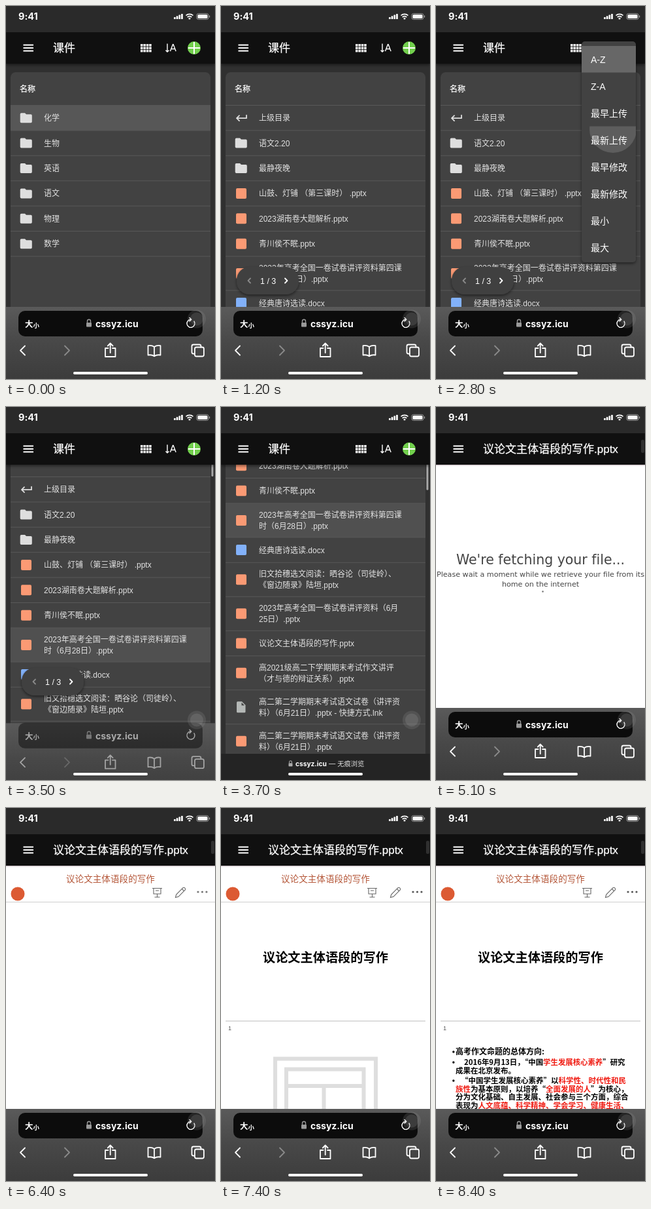
Write an HTML page that moves like this. It is 320 px wide and 569 px high and loops after 8600 ms.

```html
<!DOCTYPE html>
<html lang="zh-CN">
<head>
<meta charset="utf-8">
<title>课件</title>
<style>
html, body { margin: 0; width: 100%; height: 100%; overflow: hidden; background: #303030; }
svg { display: block; width: 100vw; height: 100vh; }
text { white-space: pre; font-variant-ligatures: none; font-family: "Liberation Sans", "Noto Sans CJK SC", "Noto Sans CJK", sans-serif; }
.ui { font-family: Inter, "Noto Sans CJK SC", "Noto Sans CJK", sans-serif; }
.han { font-family: "Noto Sans CJK SC", "Noto Sans CJK", sans-serif; }
.fetch { font-family: "DejaVu Sans", sans-serif; text-anchor: middle; }
.b { font-weight: 700; }
.m { font-weight: 500; stroke: #fff; stroke-width: .25; }
.line { fill: none; stroke: #fff; stroke-width: 1.8; stroke-linecap: round; stroke-linejoin: round; }
.thin { stroke-width: 1.4; }
.flat { stroke-linecap: butt; }
.dim { stroke: #8a8a8a; }
</style>
</head>
<body>
<svg id="stage" viewBox="0 0 320 569"></svg>
<script>
const LOOP = 8600, STEP = 100;
const LIST_TOP = 151.5, ROW = 38.4, TALL = 52;

const rect = (x, y, w, h, fill, more = '') =>
  `<rect x="${x}" y="${y}" width="${w}" height="${h}" fill="${fill}" ${more}/>`;
const circle = (x, y, r, fill, more = '') =>
  `<circle cx="${x}" cy="${y}" r="${r}" fill="${fill}" ${more}/>`;
// y is the middle of the glyphs
const text = (x, y, str, size, fill = '#fff', cls = '') =>
  `<text x="${x}" y="${(y + size * 0.37).toFixed(2)}" font-size="${size}" fill="${fill}" class="${cls}">${str}</text>`;
const line = (d, cls = '', more = '') => `<path class="line ${cls}" d="${d}" ${more}/>`;
const fill = (d, color = '#fff') => `<path d="${d}" fill="${color}"/>`;
const group = (id, ...parts) => `<g id="${id}">${parts.join('')}</g>`;

const icons = {
  folder: y => fill(`M23.5 ${y - 7.5}h5.5l2 2h7q1.8 0 1.8 1.8v9.4q0 1.8-1.8 1.8h-14.5q-1.8 0-1.8-1.8v-11.4q0-1.8 1.8-1.8z`, '#dedede'),
  up: y => line(`M39 ${y - 4}v4.5h-15m4-4-4 4 4 4`, '', 'style="stroke:#dedede"'),
  slides: y => rect(23, y - 8, 16, 16, '#fb9a74', 'rx="2"'),
  doc: y => rect(23, y - 8, 16, 16, '#82b1fa', 'rx="2"'),
  file: y => fill(`M25.5 ${y - 8.5}h6.5l5.5 5.5v10q0 1.5-1.5 1.5h-10.5q-1.5 0-1.5-1.5v-14q0-1.5 1.5-1.5z`, '#b4b8b6')
    + fill(`M31.5 ${y - 7}v4.5h4.5z`, '#424242')
};

const rootRows = ['化学', '生物', '英语', '语文', '物理', '数学'].map(s => ['folder', s]);
const subRows = [
  ['up', '上级目录'],
  ['folder', '语文2.20'],
  ['folder', '最静夜晚'],
  ['slides', '山鼓、灯铺 （第三课时） .pptx'],
  ['slides', '2023湖南卷大题解析.pptx'],
  ['slides', '青川侯不眠.pptx'],
  ['slides', '2023年高考全国一卷试卷讲评资料第四课', '时（6月28日）.pptx'],
  ['doc', '经典唐诗选读.docx'],
  ['slides', '旧文拾穗选文阅读：晒谷论（司徒岭）、', '《窗边随录》陆垣.pptx'],
  ['slides', '2023年高考全国一卷试卷讲评资料（6月', '25日）.pptx'],
  ['slides', '议论文主体语段的写作.pptx'],
  ['slides', '高2021级高二下学期期末考试作文讲评', '（才与德的辩证关系）.pptx'],
  ['file', '高二第二学期期末考试语文试卷（讲评资', '料）（6月21日）.pptx - 快捷方式.lnk'],
  ['slides', '高二第二学期期末考试语文试卷（讲评资', '料）（6月21日）.pptx'],
  ['slides', '课前演讲 (2).pptx']
];
const HOVERED = 6, PICKED = 10;

const rowBox = (rows, n) => {
  let y = LIST_TOP;
  for (let i = 0; i < n; i++) y += rows[i].length > 2 ? TALL : ROW;
  return { y, h: rows[n].length > 2 ? TALL : ROW };
};
const list = rows => rows.map(([icon, ...lines], i) => {
  const { y, h } = rowBox(rows, i), mid = y + h / 2;
  const tops = lines.length > 1 ? [mid - 8.4, mid + 8.4] : [mid];
  return icons[icon](mid) + tops.map((ty, k) => text(58, ty, lines[k], 12, '#e2e2e2')).join('')
    + rect(7, y + h - 0.5, 306, 1, '#585858');
}).join('');
const rowBar = (id, rows, n, color) => {
  const { y, h } = rowBox(rows, n);
  return rect(7, y, 306, h, color, `id="${id}"`);
};
const picked = rowBox(subRows, PICKED), pickedMid = picked.y + picked.h / 2;
const tapped = rowBox(rootRows, 3);
const clip = (id, x, y, w, h) => `<clipPath id="${id}">${rect(x, y, w, h, '#000')}</clipPath>`;
const ripple = (id, x, y, clipId) =>
  `<g clip-path="url(#${clipId})">${circle(x, y, 0, '#fff', `id="${id}" opacity=".14"`)}</g>`;

const burger = line('M26.5 59.5h15.5M26.5 64h15.5M26.5 68.5h15.5', 'flat');
const menuItems = ['A-Z', 'Z-A', '最早上传', '最新上传', '最早修改', '最新修改', '最小', '最大'];
const grid = [0, 1, 2, 3].flatMap(c => [0, 1, 2].map(r => rect(206 + c * 4.4, 58 + r * 4.4, 3.5, 3.5, '#fff'))).join('');

const slideLine = (x, y, str, size = 11.5) => text(x, y, str, size, '#000', 'han b');
const bullet = y => circle(26.8, y, 1.7, '#000');
const red = s => `<tspan fill="#f01b12">${s}</tspan>`;
const lock = (x, y, k, color) =>
  `<g transform="translate(${x} ${y}) scale(${k})">${rect(-4, -1, 8, 6.5, color, 'rx="1"')}<path d="M-2.5-1v-2.2a2.5 2.5 0 0 1 5 0V-1" fill="none" stroke="${color}" stroke-width="1.4"/></g>`;

const files = group('files',
  rect(0, 0, 320, 569, '#303030'),
  group('page',
    rect(7, 101, 306, 900, '#424242', 'rx="8"'),
    text(21, 126.5, '名称', 12, '#fff', 'm'),
    rect(7, 151, 306, 1, '#585858'),
    group('root',
      rowBar('rootHover', rootRows, 0, '#575757'),
      rowBar('rootTap', rootRows, 3, '#575757'),
      ripple('rootRipple', 120, tapped.y + 19, 'rootClip'), list(rootRows)),
    group('sub',
      rowBar('subHover', subRows, HOVERED, '#505050'),
      rowBar('pickHover', subRows, PICKED, '#505050'),
      list(subRows),
      group('pick',
        rect(7, picked.y, 306, picked.h, '#3f5654'),
        circle(31, pickedMid, 9, '#45b9b3'), line(`M27 ${pickedMid}l3 3 5.5-6`, '', 'style="stroke:#3f5654"'),
        text(58, pickedMid, '议论文主体语段的写作.pptx', 12, '#fff', 'b')),
      ripple('pickRipple', 150, pickedMid, 'pickClip'))),
  group('pager',
    rect(24, 398, 95, 42, '#404040', 'rx="20" filter="url(#shadow)"'),
    line('M45 415.5l-3.5 3.5 3.5 3.5', 'dim'), line('M98 415.5l3.5 3.5-3.5 3.5'),
    text(60, 419.5, '1 / 3', 12.5)),
  rect(314.5, 0, 3, 74, '#a8a8a8', 'id="thumb" rx="1.5"'),
  rect(0, 40, 320, 48, '#101010', 'filter="url(#shadow)"'));

const viewer = group('viewer',
  rect(0, 40, 320, 529, '#fff'),
  rect(0, 88, 320, 1.5, '#d8cdd2'),
  group('fetch',
    text(160, 232, "We're fetching your file...", 20.5, '#444', 'fetch'),
    text(160, 255, 'Please wait a moment while we retrieve your file from its', 11.14, '#444', 'fetch'),
    text(160, 269.5, 'home on the internet', 11.14, '#444', 'fetch'),
    circle(163.5, 281.5, 1.3, '#777')),
  group('deck',
    text(92, 108, '议论文主体语段的写作', 13.6, '#b5583a', 'han'),
    circle(18, 131, 10.5, '#dc5a33'),
    `<g fill="none" stroke="#666" stroke-width="1.1">
      <path d="M224 122.500h15M226 122.500v8.500h11v-8.500M229 126h5M231.500 131v5M227.500 136h8"/>
      <path d="M259.500 136.500l1.200-4.500 10.300-10.300q1.500-1 2.900.4t.4 2.900l-10.300 10.300zM269.500 123.500l3.300 3.300"/></g>`,
    group('dots', ...[294, 300.5, 307].map(x => circle(x, 128, 1.6, '#555'))),
    rect(0, 143, 320, 1, '#cfcfcf')),
  group('slide1',
    text(64, 228, '议论文主体语段的写作', 19.2, '#000', 'han b'),
    rect(7, 324.5, 306, 1, '#bcbcbc'), text(11, 336, '1', 9, '#555')),
  group('blank',
    `<g fill="none" stroke="#dedede" stroke-width="6"><path d="M83 480V382.500h154V480M100 480V398.500h118.500V480M100 424h118.500M157.500 424v56"/></g>`),
  group('slide2',
    [372, 388, 416].map(bullet).join(''),
    slideLine(30, 372, '高考作文命题的总体方向:', 12),
    slideLine(43, 388, `2016年9月13日，“中国${red('学生发展核心素养')}”研究`, 11.4),
    slideLine(30, 401, '成果在北京发布。'),
    slideLine(38, 416, `“中国学生发展核心素养”以${red('科学性、时代性和民')}`),
    slideLine(30, 428.5, `${red('族性')}为基本原则，以培养“${red('全面发展的人')}”为核心，`),
    slideLine(30, 441, '分为文化基础、自主发展、社会参与三个方面，综合'),
    slideLine(30, 454, `表现为${red('人文底蕴、科学精神、学会学习、健康生活、')}`)));

const header = [
  rect(0, 0, 320, 41, '#2a2a2a'),
  rect(0, 40, 320, 48, '#101010'),
  text(19, 16, '9:41', 14.5, '#fff', 'ui b'),
  [0, 1, 2, 3].map(i => rect(257 + i * 3.7, 17 - i * 1.7, 2.7, 3 + i * 1.7, '#fff', 'rx=".6"')).join(''),
  `<g fill="none" stroke="#fff" stroke-width="1.7"><path d="M275.500 14.500a8 8 0 0 1 11 0M277.700 17a5 5 0 0 1 6.600 0"/></g>`,
  circle(281, 19.2, 1.4, '#fff'),
  rect(292, 11.5, 18, 9, 'none', 'rx="2.7" stroke="#999"'), rect(293.5, 13, 15, 6, '#fff', 'rx="1.5"'),
  rect(311, 14.5, 1.2, 3, '#999'),
  group('browseBar', burger, text(72, 64, '课件', 17, '#fff', 'm'), grid,
    line('M247 57.5v12.5M244.5 67.5l2.5 2.500 2.500-2.500M251.500 69l4-10.500h.6l4 10.500M253 65.500h5.800', 'thin flat'),
    circle(288, 64, 10, '#72cf4d'), rect(279, 63, 18, 2, '#fff'), rect(287, 55, 2, 18, '#fff'),
    circle(252, 64, 17, '#fff', 'id="sortTap" opacity=".16"')),
  group('pickBar', line('M41 64h-13M34 57.5l-6.5 6.5 6.5 6.5'),
    line('M243.5 57.5h-6.5v14h14.5v-6.5M247 57h5v5M251.5 57.5l-9 9'),
    fill('M280 71q-4.5-.5-4.5-5t5-5q1.5-4.5 6-4.5t6 5q4 .5 4 4.8t-4.5 4.7z'),
    fill('M284.5 61.5h3.5v3.5h3l-4.8 4.7-4.7-4.7h3z', '#101010')),
  group('viewBar', burger, text(72, 64, '议论文主体语段的写作.pptx', 17, '#fff', 'm'),
    rect(314, 50, 5, 20, '#303030', 'rx="2"'))
].join('');

const menu = group('menu',
  rect(223, 54, 83, 337, '#424242', 'rx="5" filter="url(#shadow)"'),
  rect(223, 61, 83, 40.5, '#676767'),
  ripple('menuRipple', 271, 188, 'menuClip'),
  ...menuItems.map((s, i) => text(237, 81.5 + i * 41, s, 14)));

const chrome = [
  rect(0, 459, 320, 120, 'url(#barFill)', 'id="bar"'),
  group('tools',
    rect(19, 465, 282, 39, '#0c0c0c', 'rx="10"'),
    text(29, 485.5, '大', 12.5, '#fff', 'han b'), text(41.5, 487, '小', 9.5, '#fff', 'han b'),
    lock(127, 484, 1, '#9a9a9a'), text(137, 485, 'cssyz.icu', 14, '#fff', 'ui b'),
    line('M288 481a6 6 0 1 1-5-2.700M281 475.500l2.800 2.800-2.800 2.800', 'thin'),
    line('M29 518.5l-7 7 7 7'), line('M90 518.5l7 7-7 7', 'dim'),
    line('M156.5 522h-4.5v13h15.5v-13h-4.5M159.7 529v-14M155.8 518.5l3.9-4 3.9 4'),
    line('M227 520q-4-3-9.5-1.8v14.3q6-1 9.5 1.8 3.5-2.8 9.5-1.8v-14.3q-5.5-1.2-9.5 1.8v14'),
    line('M288.5 530.5h-1.5q-2.5 0-2.5-2.5v-9q0-2.5 2.5-2.5h9q2.5 0 2.5 2.5v1.5'),
    rect(289, 520.5, 14, 14, 'none', 'class="line" rx="2.5"')),
  group('compact', lock(106.5, 544, 0.75, '#aaa'), text(114, 544, 'cssyz.icu', 10.2, '#fff', 'ui b'),
    text(165, 544, '— 无痕浏览', 10.3, '#ddd', 'ui')),
  rect(103, 558, 114, 4, '#fff', 'rx="2"'),
  circle(292, 477.5, 14, '#aaa', 'opacity=".16"'), circle(292, 477.5, 10, '#ccc', 'opacity=".14"')
].join('');

document.getElementById('stage').innerHTML = `<defs>
  <linearGradient id="barFill" x1="0" y1="0" x2="0" y2="1"><stop offset="0" stop-color="#5a5a5a"/><stop offset=".45" stop-color="#484848"/><stop offset="1" stop-color="#3a3a3a"/></linearGradient>
  <filter id="shadow" x="-20%" y="-20%" width="140%" height="150%"><feDropShadow dx="0" dy="2" stdDeviation="2" flood-opacity=".5"/></filter>
  ${clip('rootClip', 7, tapped.y, 306, tapped.h)}${clip('pickClip', 7, picked.y, 306, picked.h)}${clip('menuClip', 223, 183.5, 83, 41)}
  </defs>` + files + viewer + header + menu + chrome;

const el = {};
document.querySelectorAll('[id]').forEach(e => el[e.id] = e);

const clamp = v => Math.max(0, Math.min(1, v));
const part = (t, a, b) => clamp((t - a) / (b - a));
const track = (t, keys) => {
  if (t <= keys[0][0]) return keys[0][1];
  for (let i = 1; i < keys.length; i++) {
    const [a, va] = keys[i - 1], [b, vb] = keys[i];
    if (t < b) return va + (vb - va) * (t - a) / (b - a);
  }
  return keys[keys.length - 1][1];
};
const set = (id, name, value) => el[id].setAttribute(name, value);

// visible spans in ms
const spans = {
  files: [0, 5000], root: [0, 900], rootHover: [0, 600], rootTap: [600, 900], sub: [1000, 5000],
  sortTap: [1800, 2000], menu: [1900, 3200], subHover: [3500, 4400], pickHover: [4400, 4600], pick: [4600, 5000],
  browseBar: [0, 4600], pickBar: [4600, 5000], viewBar: [5000, LOOP], pager: [1100, 3600], thumb: [3500, 5000],
  viewer: [5000, LOOP], fetch: [5000, 5300], deck: [6400, LOOP], slide1: [6700, LOOP],
  blank: [6800, 7800], slide2: [7800, LOOP]
};
const scrollKeys = [[3400, 0], [3500, 45], [3600, 145], [3700, 235], [3800, 254], [4000, 265], [4300, 269]];

function draw(t) {
  for (const id in spans) {
    const [from, to] = spans[id];
    el[id].style.display = t >= from && t < to ? '' : 'none';
  }
  const scroll = track(t, scrollKeys);
  set('page', 'transform', `translate(0 ${-scroll})`);
  set('thumb', 'y', 27 + scroll * 0.11);
  set('rootRipple', 'r', 250 * part(t, 550, 900));
  set('pickRipple', 'r', 200 * (t < 4600 ? part(t, 4300, 4600) : part(t, 4800, 5000)));

  const grow = part(t, 1800, 2200);
  set('menu', 'opacity', grow * (1 - part(t, 2900, 3200)));
  set('menu', 'transform', `translate(264 54) scale(${0.75 + grow * 0.25} ${0.56 + grow * 0.44}) translate(-264 -54)`);
  set('menuRipple', 'r', t < 2800 ? 0 : 36 + 44 * part(t, 2800, 3000));

  const fold = t < 5000 ? part(t, 3400, 3700) : 0;
  set('bar', 'transform', `translate(0 ${70 * fold})`);
  set('bar', 'fill', fold === 1 ? '#242424' : 'url(#barFill)');
  set('tools', 'transform', `translate(0 ${50 * fold})`);
  set('tools', 'opacity', clamp(1 - fold * 1.5));
  set('compact', 'opacity', clamp(fold * 2 - 1));
  set('dots', 'opacity', t < 7400 ? 0.8 : 1);
}

const start = performance.now();
function tick() {
  const t = (performance.now() - start) % LOOP;
  draw(Math.floor(t / STEP) * STEP);
  requestAnimationFrame(tick);
}
tick();
</script>
</body>
</html>
```
